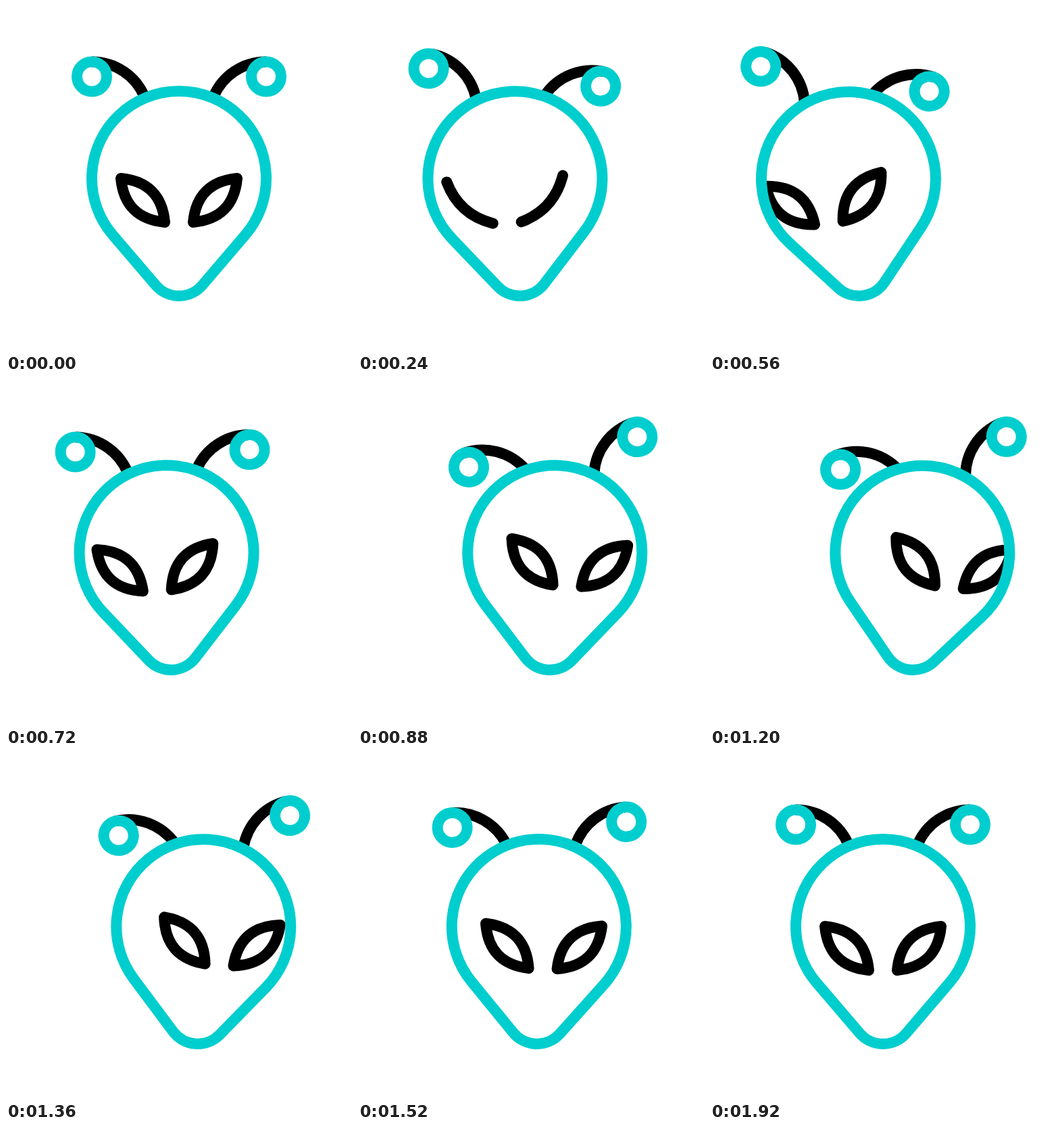
Write an HTML page that moves like this. It is 512 px wide and 512 px high and loops after 2 s.

```html
<!DOCTYPE html>
<html lang="en">
<head>
<meta charset="utf-8">
<title>Alien head</title>
<style>
  html, body { margin: 0; width: 100%; height: 100%; overflow: hidden; background: #fff; }
  svg { display: block; width: 100vw; height: 100vh; }
  path, circle { fill: none; stroke-width: 16; stroke-linejoin: round; stroke-linecap: round; }
  .teal { stroke: #00cece; }
  .black { stroke: #000; }
  .antenna .black { stroke-linecap: butt; }
</style>
</head>
<body>
<svg viewBox="0 0 512 512">
  <defs>
    <path id="outline" d="M158 338.9A129 129 0 1 1 354 338.9L290.5 413.1A45.4 45.4 0 0 1 221.5 413.1Z"/>
    <clipPath id="inside"><use href="#outline"/></clipPath>
  </defs>
  <g id="head">
    <g class="antenna" id="antennaL">
      <path class="black" d="M127 82.5A84.5 84.5 0 0 1 205 134.5"/>
      <circle class="teal" cx="127" cy="104.5" r="22"/>
    </g>
    <g class="antenna" id="antennaR">
      <path class="black" d="M385 82.5A84.5 84.5 0 0 0 307 134.5"/>
      <circle class="teal" cx="385" cy="104.5" r="22"/>
    </g>
    <g clip-path="url(#inside)">
      <g id="eyes">
        <path class="black" id="eyeL"/>
        <path class="black" id="eyeR"/>
      </g>
    </g>
    <use href="#outline" class="teal"/>
  </g>
</svg>
<script>
const LOOP = 2000, STEP = 80;

// Each track lists [time, value] keys, joined by sine easing.
const tracks = {
  shift: [[0, 0], [510, -36.3], [530, -36.3], [1060, 50], [1720, -2], [1920, 0]],
  tilt:  [[0, 0], [510, -7], [530, -7], [1060, 7], [1700, 0]],
  sway:  [[0, 0], [460, 22], [1020, -26], [1040, -26], [1720, 1.5], [1920, 0]],
  eyeX:  [[0, 0], [540, -37], [550, -37], [1090, 51], [1660, 0]],
  eyeY:  [[0, 0], [520, 1], [880, -15.5], [1060, -15.5], [1680, 0]],
  open:  [[0, 1], [220, 0], [260, 0], [480, 1]]
};

const $ = id => document.getElementById(id);
const move = (id, value) => $(id).setAttribute('transform', value);

function at(keys, t) {
  const i = keys.findIndex(k => k[0] > t);
  if (i < 0) return keys[keys.length - 1][1];
  const [t0, a] = keys[i - 1], [t1, b] = keys[i];
  return a + (b - a) * (1 - Math.cos(Math.PI * (t - t0) / (t1 - t0))) / 2;
}

// Almond between an outer and an inner tip; side is 1 for left, -1 for right.
function eyePath(side, open) {
  const x = dx => 256 - side * dx;
  const lid = bulge => {
    const d = bulge * Math.SQRT2;
    return `${x(53.5 + d)} ${287.5 + d}`;
  };
  const lower = 12 + 7 * open, upper = 12 - 31 * open;
  const outer = `${x(86)} 255`, inner = `${x(21)} 320`;
  return `M${outer}Q${lid(lower)} ${inner}Q${lid(upper)} ${outer}Z`;
}

function draw(t) {
  const p = {};
  for (const name in tracks) p[name] = at(tracks[name], t);

  move('head', `translate(${p.shift} 0) rotate(${p.tilt} 256 383.6)`);
  const bend = p.sway - p.tilt;
  move('antennaL', `rotate(${bend} 205 134.5)`);
  move('antennaR', `rotate(${bend} 307 134.5)`);

  // The eye offset is given in stage axes, so undo the head tilt.
  move('eyes', `rotate(${-p.tilt}) translate(${p.eyeX} ${p.eyeY}) rotate(${p.tilt})`);
  $('eyeL').setAttribute('d', eyePath(1, p.open));
  $('eyeR').setAttribute('d', eyePath(-1, p.open));
}

const start = performance.now();
function frame() {
  const t = (performance.now() - start) % LOOP;
  draw(Math.floor(t / STEP) * STEP);
  requestAnimationFrame(frame);
}
frame();
</script>
</body>
</html>
```
